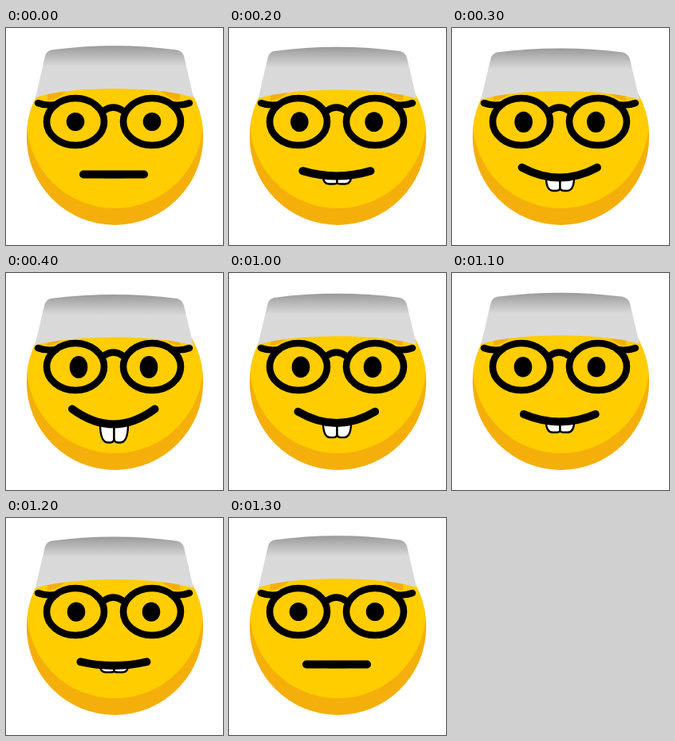
Write an HTML page that moves like this. It is 272x272 px and loops after 1.9 s.

```html
<!DOCTYPE html>
<html lang="en">
<head>
<meta charset="utf-8">
<title>Smiling face with glasses</title>
<style>
  html, body { margin: 0; width: 100%; height: 100%; overflow: hidden; background: #fff; }
  svg { display: block; width: 100vw; height: 100vh; }
  .line { fill: none; stroke: #000; stroke-linecap: round; stroke-linejoin: round; }

  /* Rest, smile in 3 steps, hold, relax in 4 steps. */
  .hat, .mouth, .tooth, .eye { animation: 1900ms infinite; }
  .hat { animation-name: hat; }
  .mouth { animation-name: mouth; }
  .tooth { animation-name: tooth; }
  .eye { animation-name: eye; }

  @keyframes hat {
    0%, 5.26%, 68.42%, 100% {
      animation-timing-function: steps(3);
      d: path("M49 35Q50.5 29 57 27.5Q136 17 214 27.5Q221 29 223 35L235 87C190 72.3 81 72.3 37 87Z");
    }
    21.05%, 47.36% {
      animation-timing-function: steps(4);
      d: path("M48 41Q49.5 34 56 32Q136 22 214 32Q221 34 223 41L235 91C190 77 81 77 36 91Z");
    }
  }
  @keyframes mouth {
    0%, 5.26%, 68.42%, 100% {
      animation-timing-function: steps(3);
      d: path("M97 183.5Q135 183.5 173 183.5");
    }
    21.05%, 47.36% {
      animation-timing-function: steps(4);
      d: path("M83 170.5Q135 208.5 186.5 170.5");
    }
  }
  @keyframes tooth {
    0%, 5.26%, 68.42%, 100% {
      animation-timing-function: steps(3);
      d: path("M0 184L0 187Q0 187 -5 187L-11 187Q-17.5 187 -17.5 184Z");
    }
    21.05%, 47.36% {
      animation-timing-function: steps(4);
      d: path("M0 189L0 207Q0 212.5 -5 212.5L-8 212.5Q-17.5 212 -17.5 189Z");
    }
  }
  @keyframes eye {
    0%, 5.26%, 68.42%, 100% {
      animation-timing-function: steps(3);
      cx: -48px; cy: 117.5px; ry: 11.5px;
    }
    21.05%, 47.36% {
      animation-timing-function: steps(4);
      cx: -44px; cy: 118px; ry: 14px;
    }
  }
</style>
</head>
<body>
<svg viewBox="0 0 272 272">
  <defs>
    <linearGradient id="cloth" x2="0" y2="1">
      <stop offset="0" stop-color="#9a9a9a"/>
      <stop offset=".4" stop-color="#d9d9d9"/>
      <stop offset="1" stop-color="#dadada"/>
    </linearGradient>
    <clipPath id="head"><circle cx="136.5" cy="136.3" r="110.7"/></clipPath>
    <clipPath id="below"><rect y="60" width="272" height="212"/></clipPath>
  </defs>

  <g clip-path="url(#below)">
    <g clip-path="url(#head)">
      <rect width="272" height="272" fill="#f5af0a"/>
      <circle cx="136.5" cy="115.5" r="110.5" fill="#ffcd00"/>
      <path d="M52 91Q64 90 76 79H52ZM218 91Q206 90 194 79H218Z" fill="#f5af0a"/>
    </g>
  </g>

  <path class="hat" fill="url(#cloth)"/>

  <g id="lens">
    <ellipse class="line" cx="87" cy="117.5" rx="36" ry="29.5" stroke-width="8.6"/>
    <path class="line" d="M40 94Q50 98 63 96" stroke-width="8.4"/>
  </g>
  <use href="#lens" transform="matrix(-1 0 0 1 270 0)"/>
  <path class="line" d="M122 104Q134.5 95 147 104" stroke-width="8.4"/>

  <!-- The right pupil mirrors the left one. -->
  <g transform="translate(135)"><ellipse class="eye" rx="11.3"/></g>
  <g transform="matrix(-1 0 0 1 135 0)"><ellipse class="eye" rx="11.3"/></g>

  <g fill="#fff" stroke="#000" stroke-width="2.4" stroke-linejoin="round">
    <g transform="translate(135.5)"><path class="tooth"/></g>
    <g transform="matrix(-1 0 0 1 135.5 0)"><path class="tooth"/></g>
  </g>
  <path class="mouth line" stroke-width="10"/>
</svg>
</body>
</html>
```
